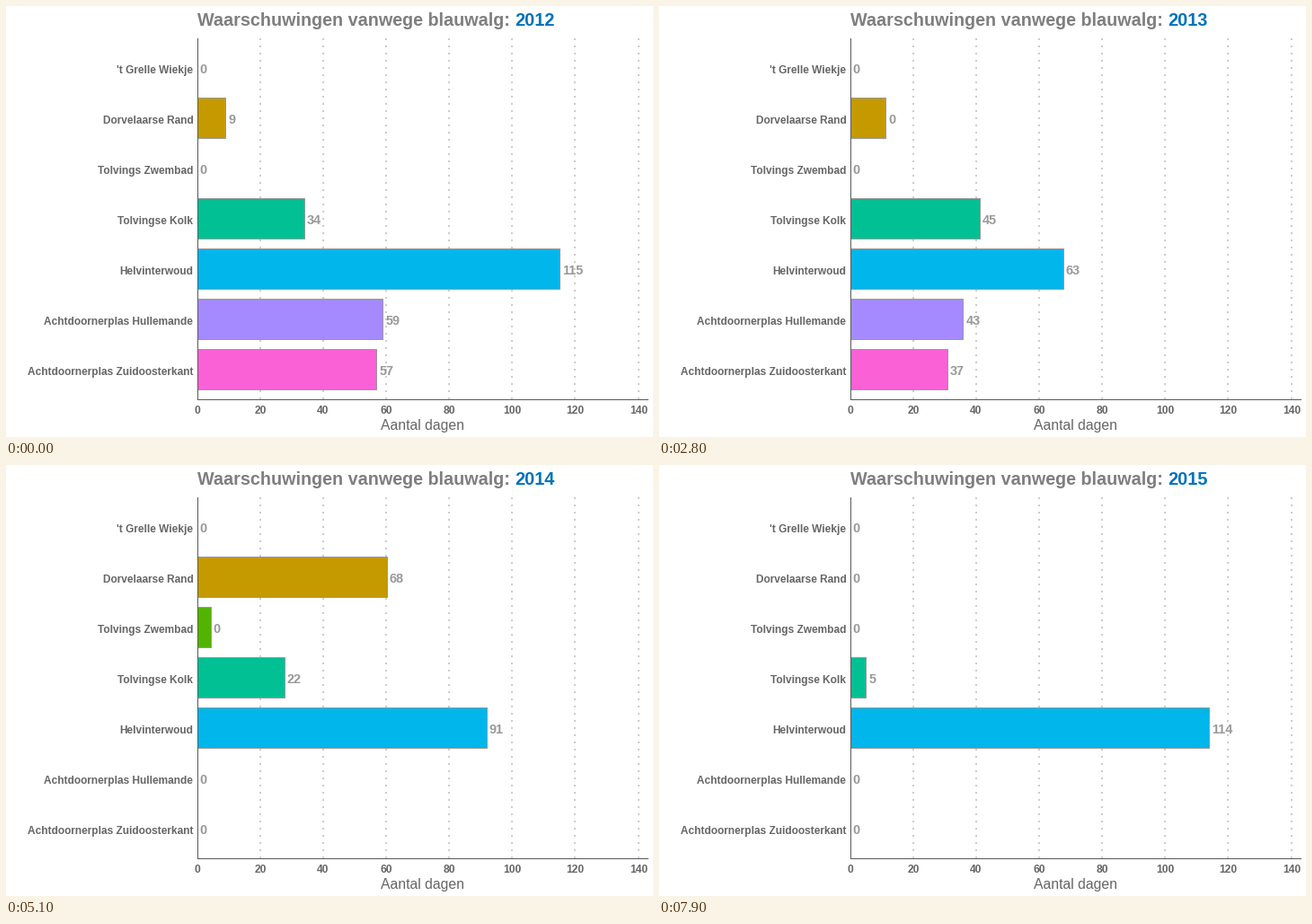
Recreate the animation shown at these times as a matplotlib script. Size 720 by 480 pixels, loop 8000 ms.

```python
import matplotlib.pyplot as plt
from matplotlib.animation import FuncAnimation
from matplotlib.patches import Rectangle

W, H, DPI = 720, 480, 100
PX = 72 / DPI
LEFT, RIGHT, TOP, BOTTOM = 213, 714, 36, 438
UNIT = 3.508                # pixels per day
ROW_TOP, ROW_STEP, BAR_H = 46, 56, 45
FIRST_YEAR = 2012
LEAD, CYCLE, MOVE = 5, 23, 6  # frames before first move, per year, per move

NAMES = ["'t Grelle Wiekje", "Dorvelaarse Rand", "Tolvings Zwembad",
         "Tolvingse Kolk", "Helvinterwoud", "Achtdoornerplas Hullemande",
         "Achtdoornerplas Zuidoosterkant"]
COLORS = ["#F8766D", "#C49A00", "#53B400", "#00C094",
          "#00B6EB", "#A58AFF", "#FB61D7"]
DAYS = [
    [0, 9, 0, 34, 115, 59, 57],
    [0, 0, 0, 45, 63, 43, 37],
    [0, 68, 0, 22, 91, 0, 0],
    [0, 21, 26, 56, 96, 0, 0],
    [0, 0, 0, 5, 114, 0, 0],
]

plt.rcParams["font.family"] = "Liberation Sans"
fig = plt.figure(figsize=(W / DPI, H / DPI), dpi=DPI, facecolor="white")
ax = fig.add_axes([0, 0, 1, 1])
ax.set_xlim(0, W)
ax.set_ylim(H, 0)
ax.axis("off")


def write(x, y, text, size, color, ha="left", weight="bold"):
    return ax.text(x, y, text, fontsize=size * PX, color=color, ha=ha,
                   va="baseline", weight=weight, zorder=5)


def line(xs, ys, color, width, z, **kw):
    ax.plot(xs, ys, color=color, lw=width * PX, zorder=z, **kw)


# Grid, axes and fixed text
for day in range(0, 141, 20):
    x = int(LEFT + day * UNIT)
    if day:
        line([x, x], [BOTTOM, TOP], "#CCCCCC", 2, 1, linestyle=(0, (1, 3)))
    write(x, 454, str(day), 12, "#666666", "center")
# Whole-number positions snap to the centre of that pixel
line([LEFT, LEFT], [TOP, BOTTOM], "#595959", 1, 4)
line([LEFT, RIGHT], [BOTTOM, BOTTOM], "#595959", 1, 4)

write(LEFT, 22, "Waarschuwingen vanwege blauwalg:", 19.75, "#7F7F7F")
year_text = write(565.8, 22, "", 20, "#0072BC")
write(463.4, 472, "Aantal dagen", 15.7, "#666666", "center", "normal")

bars, counts = [], []
for i, (name, color) in enumerate(zip(NAMES, COLORS)):
    top = ROW_TOP + i * ROW_STEP
    write(208.3, top + 29, name, 11.9, "#666666", "right")
    bar = Rectangle((LEFT, top), 0, BAR_H, facecolor=color,
                    edgecolor="#999999", lw=PX, zorder=2)
    bars.append(ax.add_patch(bar))
    counts.append(write(LEFT, top + 29, "", 14.4, "#999999"))


def draw(frame):
    state, step = divmod(frame - LEAD, CYCLE)
    step += 1
    t = min(step / MOVE, 1)
    old, new = DAYS[state], DAYS[state + 1]
    year_text.set_text(str(FIRST_YEAR + state + (step > MOVE)))
    for bar, count, a, b in zip(bars, counts, old, new):
        value = a + (b - a) * t
        bar.set_width(int(value * UNIT))
        bar.set_visible(value > 0)
        count.set_x(LEFT + 2.6 + value * UNIT)
        count.set_text(str(a if t < .5 else b))
    return [year_text, *bars, *counts]


anim = FuncAnimation(fig, draw, frames=80, interval=100, repeat=True,
                     repeat_delay=0, blit=False)
plt.show()
```
